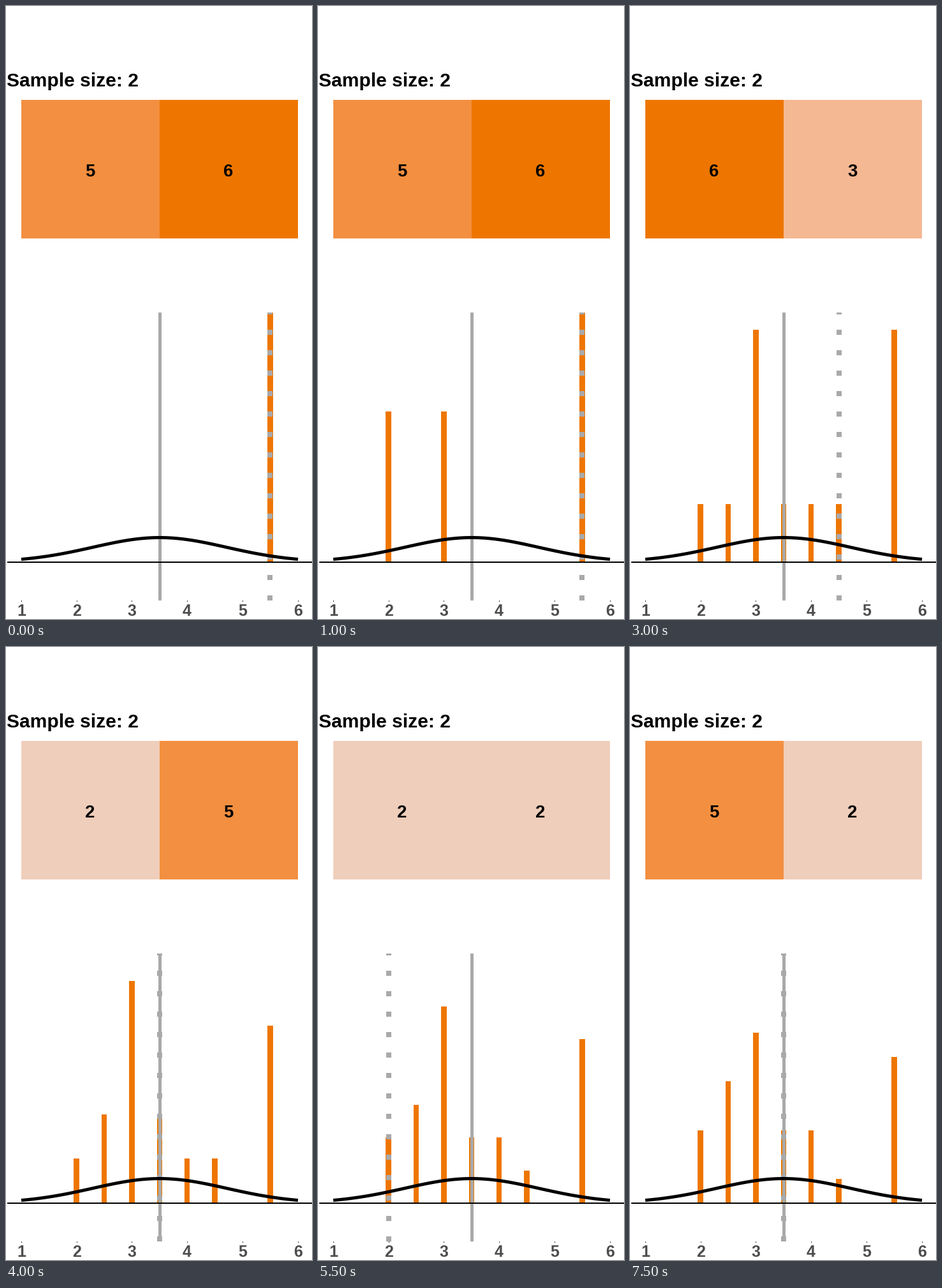
A matplotlib script for the animation above (8000 ms loop, 480 px wide and 960 px high).

```python
import numpy as np
import matplotlib.pyplot as plt
from matplotlib.animation import FuncAnimation
from matplotlib.patches import Rectangle

W, H, DPI = 480, 960, 100
TOP, BASE, BOTTOM = 480, 871, 931
GREY, ORANGE = "#a9a9a9", "#ee7600"
SHADES = dict(zip(range(1, 7), ["#e5e5e5", "#efcebb", "#f4b893",
                                "#f5a46b", "#f38f40", ORANGE]))
BAR_SCALE = 1182  # bar height in pixels for a share of 1
BINS = np.arange(1.5, 6, 0.5)  # the outermost bars fall outside the limits

# Two samples are drawn per step; only the second is shown as tiles.
ROLLS = [(5, 6), (2, 2), (5, 6), (5, 1), (3, 3), (3, 2), (6, 3), (2, 3),
         (2, 5), (6, 6), (3, 5), (2, 2), (6, 5), (2, 2), (5, 3), (5, 2)]
SKIPPED = [3, 5.5, 5.5, 3, 3.5, 4, 3, 6, 2.5, 3, 5.5, 2.5, 6, 2.5, 3]
MEANS = [sum(r) / 2 for r in ROLLS]
HISTORY = MEANS[:1] + [m for pair in zip(SKIPPED, MEANS[1:]) for m in pair]


def px(value):
    return 24.08 + 86.7 * (value - 1)


plt.rcParams["font.family"] = "Liberation Sans"
fig = plt.figure(figsize=(W / DPI, H / DPI), dpi=DPI, facecolor="white")
ax = fig.add_axes([0, 0, 1, 1])
ax.set(xlim=(0, W), ylim=(H, 0))
ax.axis("off")


def box(x0, y0, x1, y1, color, z):
    return ax.add_patch(Rectangle((x0, y0), x1 - x0, y1 - y0, facecolor=color,
                                  linewidth=0, zorder=z))


def label(x, y, text, size, color="black", ha="center"):
    return ax.text(x, y, text, fontsize=size * 72 / DPI, color=color, ha=ha,
                   va="baseline", weight="bold", zorder=9)


label(1, 126, "Sample size: 2", 30, ha="left")
tiles = [box(24, 147, 241, 364, "white", 1), box(241, 147, 458, 364, "white", 1)]
digits = [label(132, 267, "", 27.5), label(349, 267, "", 27.5)]

bars = []
for b in BINS:
    left, right = round(px(b) - 4.32), round(px(b) + 4.32)
    bars.append(box(left, BASE, right, BASE, ORANGE, 2))

box(239, TOP, 244, BOTTOM, GREY, 3)
dashes = [box(0, max(y, TOP), 8, y + 8, GREY, 4)
          for y in range(BOTTOM - 8, TOP - 8, -32)]

v = np.linspace(1, 6, 101)
density = np.exp(-(v - 3.5) ** 2 / (2 * 35 / 24))
ax.plot(np.linspace(24, 458, 101), BASE - 38.5 * density, color="black",
        linewidth=5 * 72 / DPI, solid_capstyle="butt", zorder=5)
box(2, 870, W, 872, "black", 6)

for n in range(1, 7):
    x = round(px(n))
    box(x, 931, x + 1, 933, "#333333", 6)
    label(x, 955, str(n), 25, "#4d4d4d")


def update(i):
    for tile, digit, roll in zip(tiles, digits, ROLLS[i]):
        tile.set_facecolor(SHADES[roll])
        digit.set_text(str(roll))
    seen = HISTORY[:2 * i + 1]
    for bar, b in zip(bars, BINS):
        top = max(TOP, round(BASE - BAR_SCALE * seen.count(b) / len(seen)))
        bar.set_y(top)
        bar.set_height(BASE - top)
    for dash in dashes:
        dash.set_x(round(px(MEANS[i])) - 4)
    return tiles + digits + bars + dashes


anim = FuncAnimation(fig, update, frames=len(ROLLS), interval=500, repeat=True)
plt.show()
```
